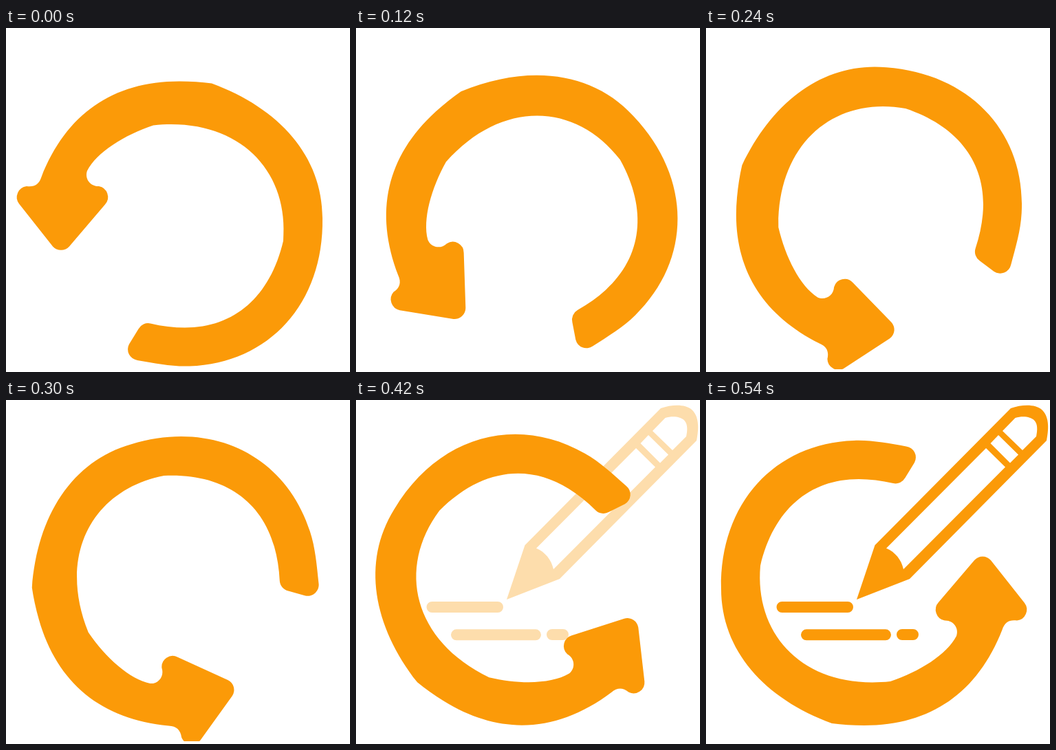
Animation of 500 by 500 pixels, one loop 0.93 s. Source, as an HTML page:

```html
<!DOCTYPE html>
<html lang="en">
<head>
<meta charset="utf-8">
<title>Rotating arrow and pencil</title>
<style>
  html, body { margin: 0; height: 100%; overflow: hidden; background: #fff; }
  svg { display: block; fill: #fb9a08; }
  .lines { fill: none; stroke: #fb9a08; stroke-width: 16; stroke-linecap: round; }
</style>
</head>
<body>
<svg width="500" height="496" viewBox="0 0 500 496">
  <g id="pencil" opacity="0">
    <path fill-rule="evenodd" d="
      M219 290 L245.5 211 L443 12 C460 6 479 6 488 14 C498 23 499 39 495 59 L296 260 Z
      M262 215.5 L407 70 L435 97.5 L287 246 C284 232 275 221 262 215.5 Z
      M413.5 63 L425 51 L454 79.5 L442 91.5 Z
      M431 45 L449.5 26 C460 23 472 24 477.5 30 C482 35 482 43 480 53 L460 73 Z"/>
    <path class="lines" d="M110.5 301 H206 M146 341.3 H261 M285 341 H301"/>
  </g>
  <path id="arrow" d="
    M215 59 C240 58 265 63 291 67.5 A16 16 0 0 1 303 91 L289.5 113 A16 16 0 0 1 272 121
    C255 117 238 115 222 115 C150 115 98 160 79 241
    C70 345 146 422 268 409 C310 395 350 370 364 343
    C368 332 360 320 347 320.5 A16 16 0 0 1 338 294
    L390 233 A16 16 0 0 1 414 233 L463 295 A16 16 0 0 1 452 320.5
    C441 319 434 323 430.5 334
    C395 425 327 473 230 473 Q205 473 183 470
    C85 434 22 364 22 274 C20 150 100 63 215 59 Z"/>
</svg>
<script>
  const LOOP = 930, STEP = 30, TURN_END = 510, FADE_START = 360, FADE_END = 540;
  const arrow = document.getElementById('arrow');
  const pencil = document.getElementById('pencil');
  const progress = (t, from, to) => Math.min(1, Math.max(0, (t - from) / (to - from)));
  const start = performance.now();

  function draw(now) {
    const elapsed = Math.max(0, now - start) % LOOP;
    const t = Math.floor(elapsed / STEP) * STEP;
    const angle = 180 * (1 - progress(t, 0, TURN_END));
    arrow.setAttribute('transform', `rotate(${angle} 241 275.2)`);
    pencil.setAttribute('opacity', progress(t, FADE_START, FADE_END));
    requestAnimationFrame(draw);
  }
  draw(start);
</script>
</body>
</html>
```
